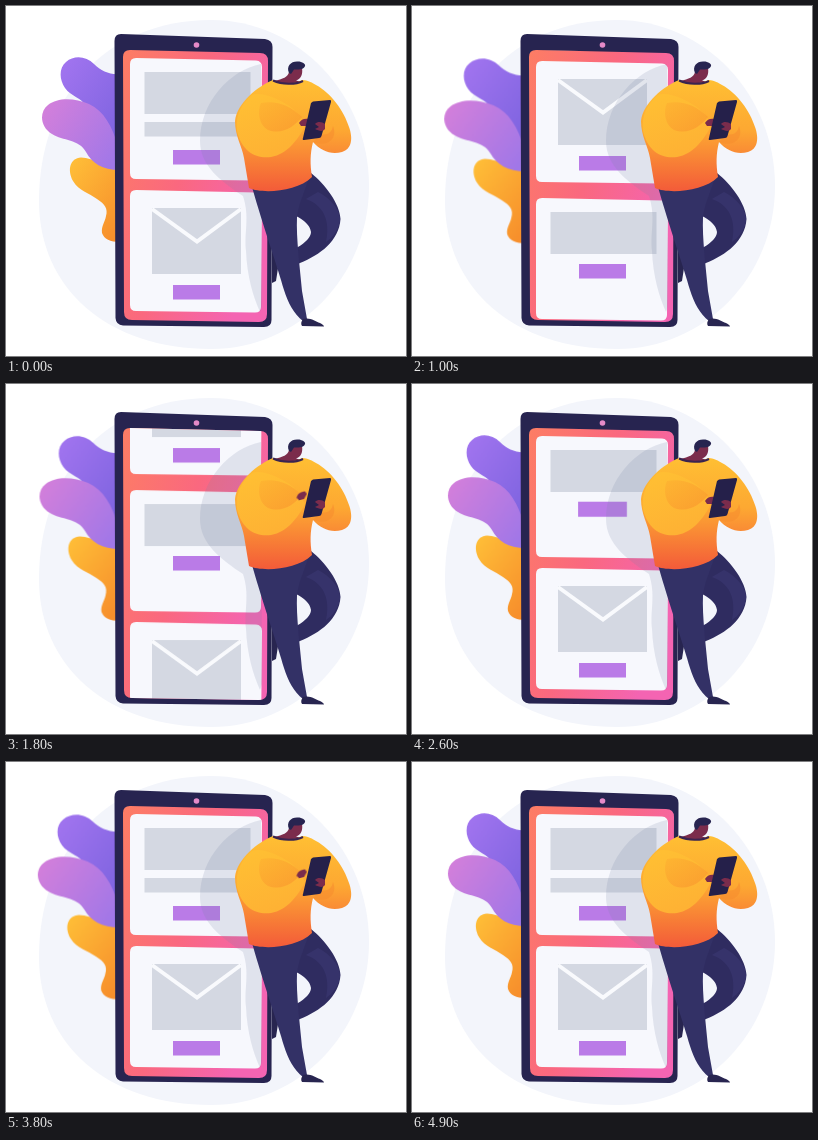
These frames come from a looping animation (400x350 px, 5000 ms). An HTML page:

```html
<!DOCTYPE html>
<html lang="en">
<head>
<meta charset="utf-8">
<title>Mobile feed</title>
<style>
html, body { margin: 0; width: 100%; height: 100%; overflow: hidden; background: #fff; }
svg { display: block; width: 100%; height: 100%; }

#leaves { transform-origin: 112px 165px; animation: sway 2500ms infinite; }
#feed { animation: scroll 5000ms infinite; }
#swipe { transform-origin: 300px 118px; animation: swipe 2500ms infinite; }
#grow { transform-box: fill-box; transform-origin: 50% 0; animation: grow 5000ms infinite; }
#drop { animation: drop 5000ms infinite; }
#press { transform-box: fill-box; transform-origin: center; animation: press 5000ms infinite; }
#leaves, #feed, #swipe, #grow, #drop, #press { animation-timing-function: cubic-bezier(.37, 0, .63, 1); }

@keyframes sway {
  0%, 100% { transform: none; }
  50% { transform: translateY(1.5px) scaleX(1.055); }
}
@keyframes scroll {
  0% { transform: none; }
  17%, 26.4% { transform: translateY(-129px); }
  43.2%, 100% { transform: translateY(-269px); }
}
@keyframes swipe {
  0%, 4% { transform: none; }
  14%, 24% { transform: translate(-2.5px, -5px) rotate(-14deg); }
  36%, 46% { transform: none; }
  52%, 76% { transform: translate(-2.5px, -5px) rotate(-14deg); }
  88%, 100% { transform: none; }
}
@keyframes press {
  0%, 50% { transform: none; }
  53% { transform: scale(1.05); }
  57%, 100% { transform: none; }
}
@keyframes grow {
  0%, 57% { transform: scaleY(0); }
  67%, 100% { transform: none; }
}
@keyframes drop {
  0%, 57% { transform: none; }
  67%, 100% { transform: translateY(26px); }
}
</style>
</head>
<body>
<svg viewBox="0 0 400 350" aria-label="Man leaning on a large phone with a scrolling feed">
  <defs>
    <linearGradient id="violet" x1="0" y1="0" x2=".8" y2="1">
      <stop stop-color="#a375f0"/><stop offset="1" stop-color="#7a62de"/>
    </linearGradient>
    <linearGradient id="lilac" x1="0" y1=".2" x2="1" y2=".8">
      <stop stop-color="#d27fdb"/><stop offset="1" stop-color="#a077e8"/>
    </linearGradient>
    <linearGradient id="amber" x1="0" y1="0" x2=".8" y2="1">
      <stop stop-color="#ffc038"/><stop offset="1" stop-color="#f78f2c"/>
    </linearGradient>
    <linearGradient id="screen" x1="0" y1="0" x2="1" y2=".5">
      <stop stop-color="#fd7d64"/><stop offset=".5" stop-color="#fa687f"/><stop offset="1" stop-color="#f464b2"/>
    </linearGradient>
    <linearGradient id="sweater" x1="0" y1="0" x2="0" y2="1">
      <stop stop-color="#ffbf33"/><stop offset=".45" stop-color="#fda832"/><stop offset="1" stop-color="#f35b39"/>
    </linearGradient>
    <linearGradient id="sleeve" gradientUnits="userSpaceOnUse" x1="245" y1="90" x2="268" y2="152">
      <stop stop-color="#ffbf33"/><stop offset="1" stop-color="#feb134"/>
    </linearGradient>
    <linearGradient id="fold" x1="0" y1="0" x2="1" y2="1">
      <stop stop-color="#fdae30"/><stop offset="1" stop-color="#f88c2c"/>
    </linearGradient>
    <path id="glass" d="M124 44 L254 47 Q262 47 262 55 L261 308 Q261 316 253 316 L126 314 Q118 314 118 306 L117 51 Q117 44 124 44Z"/>
    <clipPath id="view"><use href="#glass"/></clipPath>

    <path id="card" fill="#f7f8fd" d="M130 0 L250 2.5 Q256 3 256 9 L255 117 Q255 122.5 249 122.5 L130 121 Q124 121 124 115 L124 6 Q124 0 130 0Z"/>
    <rect id="button" x="167" width="47" height="14.5" fill="#ba7be7"/>
    <rect id="photo" x="138.500" y="14" width="106" height="42" fill="#d4d8e2"/>
    <rect id="bar" x="138.500" y="64" width="106" height="14.5" fill="#d4d8e2"/>
    <g id="mail">
      <use href="#card"/>
      <rect x="146" y="18" width="89" height="66" fill="#d4d8e2"/>
      <path d="M146 19 L191 51.500 L235 19" fill="none" stroke="#f9fafd" stroke-width="4"/>
      <use href="#button" y="95"/>
    </g>
  </defs>

  <path fill="#f3f5fb" d="M205 14 C292 14 363 88 363 180 C363 271 292 343 205 343 C102 343 33 283 33 195 C33 92 98 14 205 14Z"/>

  <g id="leaves">
    <path fill="url(#violet)" d="M114 68 C104 69 95 65 88 58 C80 50 68 49 60 56 C53 62 53 73 59 82 C65 91 76 91 80 101 C84 112 82 123 90 136 C96 147 104 157 114 163Z"/>
    <path fill="url(#amber)" d="M114 163 C100 161 88 152 75 151.500 C64 152 61 164 67 175 C73 185 83 187 91 193 C99 198 102 203 100 210 C99 216 95 220 96 227 C98 233 104 236 114 236Z"/>
    <path fill="url(#lilac)" d="M114 164 C96 164 86 157 80 146 C73 133 57 135 46 128 C34 121 33 106 42 99 C52 91 69 92 83 98 C98 105 106 120 112 140Z"/>
  </g>

  <path fill="#272450" d="M115 28 L259 33 Q266.500 34 266.500 41 L265.500 314 Q265.500 321 258 321 L117 319.500 Q110 319 109.500 312 L108.500 35 Q108.500 28 115 28Z"/>
  <circle cx="190.500" cy="39" r="2.800" fill="#e58ac8"/>
  <use href="#glass" fill="url(#screen)"/>

  <g clip-path="url(#view)">
    <g id="feed">
      <g transform="translate(0 52)">
        <use href="#card"/><use href="#photo"/><use href="#bar"/>
        <use href="#button" y="92"/>
      </g>
      <use href="#mail" y="184"/>
      <g transform="translate(0 321)">
        <use href="#card"/><use href="#photo"/>
        <g id="grow"><use href="#bar"/></g>
        <g id="drop"><g id="press"><use href="#button" y="66"/></g></g>
      </g>
      <use href="#mail" y="453"/>
    </g>
    <path fill="#7888a8" fill-opacity=".18" d="M255 58 C224 64 194 96 194 135 C194 160 216 176 237 190 C244 212 238 225 240 245 C241 270 247 290 254 306 L256 300Z"/>
  </g>

  <!-- legs -->
  <path fill="#282550" d="M266 238 L272 262 L270 275 L266 277Z"/>
  <path fill="#2f2c60" d="M284 180 L305 167 C319 178 334 198 334.500 213 C333 235 314 249 294 257 L284 262 L282 246 L292 241 C299 237 305 231 305 226 C304 219 298 214 290 210Z"/>
  <path fill="#3b3872" d="M312 186 C324 192 335 204 334 215 C332 225 326 232 320 236 C324 218 320 200 300 193Z" opacity=".65"/>
  <path fill="#333166" d="M246 181 L304 168 C299 186 293 196 291 211 C290 232 294 262 296 285 L301 313 L297 315 C288 308 282 297 278 284 C272 262 257 220 246 181Z"/>
  <path fill="#282550" d="M297 313 C304 311 309 315 314 317 Q318 319 318 320.500 L296 320 Q294 317 297 313Z"/>

  <!-- head -->
  <path fill="#7b2c4c" d="M268 75 C277 73 282 71 283 66 L286 61 L296 62 C297 68 295 73 290 74.500 L296 76 L294 80 L272 80Z"/>
  <path fill="#272450" d="M283 67 C280 60 285 55 292 55.500 C296 55.500 300 58 299 60 C298 63 295 63.500 288 63.500 L285 68Z"/>

  <!-- sweater and arms -->
  <path fill="url(#sweater)" d="M267 74 C252 80 231 97 229 115 C229 130 236 140 238 152 L243 182 C256 188 291 186 306 171 C304 158 304 148 307 136 C315 145 325 149 336 146 C346 143 347 132 343 121 C338 105 325 87 310 79 C304 75 299 74 296 74 C290 78 276 79 267 74Z"/>
  <path fill="none" stroke="#3a2450" stroke-width="2" d="M267 74.500 C276 78.500 289 79 297 75"/>
  <path fill="url(#sleeve)" d="M246 89 C235 98 229 110 231 125 C236 146 250 153 265 151 C281 148 291 135 299 120 L294 110 C285 98 258 84 246 89Z"/>
  <path fill="url(#fold)" opacity=".55" d="M255 97 C251 106 253 119 262 124 C276 129 288 121 296 111 C284 99 270 94 255 97Z"/>
  <path fill="#f78d2e" opacity=".6" d="M307 136 L315 128 C322 130 326 126 327 120 C332 132 322 142 307 136Z"/>

  <g id="swipe">
    <path fill="#7b2c4c" d="M293 117 C295 113 299 112 303 113 L304 116 L300 120 L295 120Z"/>
  </g>
  <path fill="#25204a" d="M307 95.500 L324 94 Q325.500 94 325 96 L315.500 130 Q315 132 313 132 L298 134 Q296 134 297 132 L305 97Z"/>
  <path fill="#7b2c4c" d="M309 118 C312 115 316 116 319 118 L319 123 C317 126 313 125 309 123 L313 121Z"/>
</svg>
</body>
</html>
```
